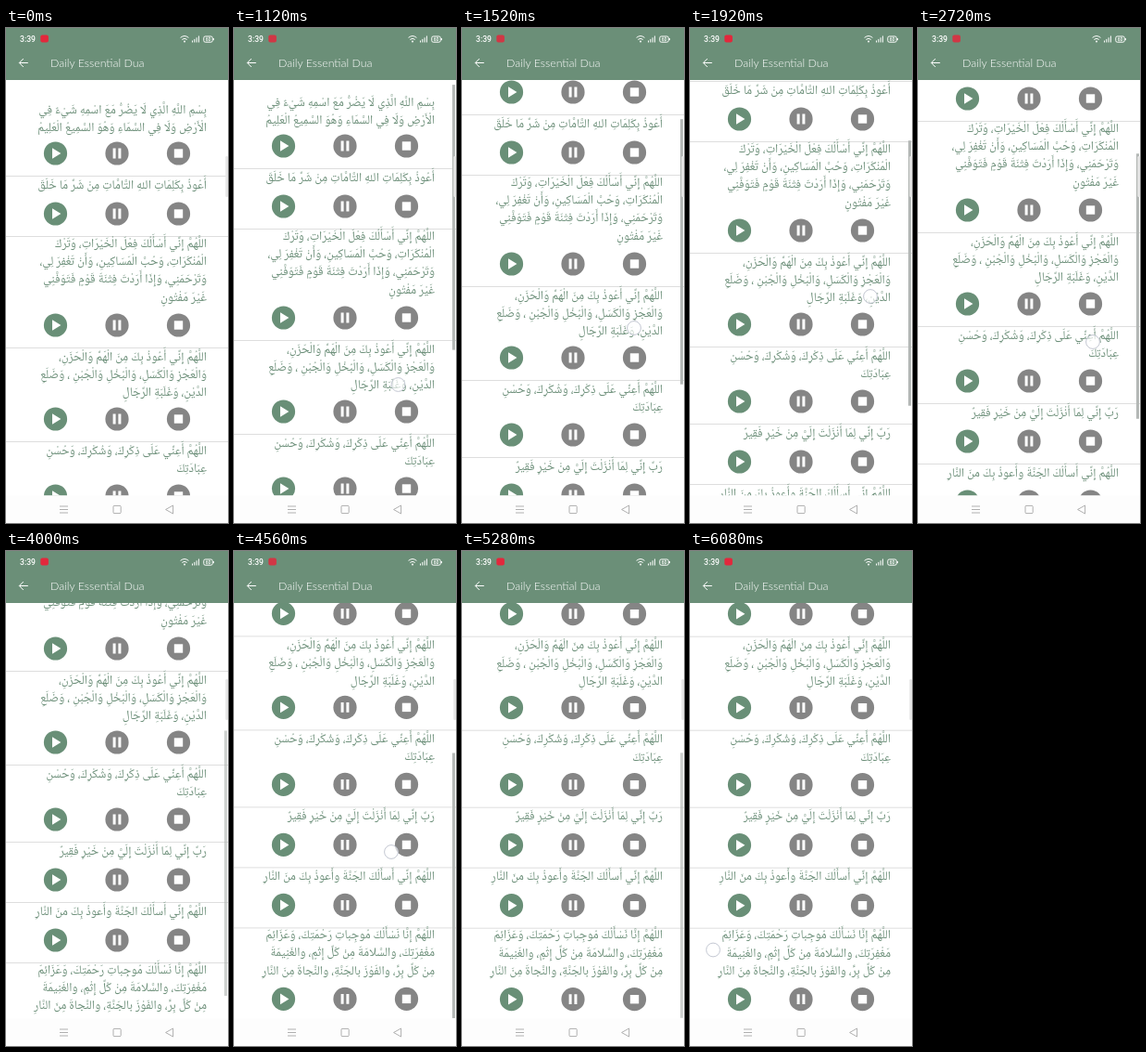
Animation of 240 by 533 pixels, one loop 6160 ms. Source, as an HTML page:

```html
<!DOCTYPE html>
<html lang="en">
<head>
<meta charset="utf-8">
<title>Daily Essential Dua</title>
<style>
  html, body { margin: 0; width: 100%; height: 100%; overflow: hidden; background: #fff; }
  svg { display: block; width: 100%; height: 100%; }
  #list text { font-family: "Noto Naskh Arabic", "Noto Sans Arabic", "DejaVu Sans", sans-serif; fill: #6c8f79; direction: rtl; }
  .title { font: 300 12.3px Lato, sans-serif; fill: #fff; }
  .clock { font: 500 8.6px Roboto, sans-serif; fill: #fff; }
  .level { font: 500 5px Roboto, sans-serif; fill: #fff; text-anchor: middle; }
  .line { fill: none; stroke: #fff; stroke-width: 1; }
  .nav { fill: none; stroke: #a6a6a6; stroke-width: .9; }
</style>
</head>
<body>
<svg viewBox="0 0 240 533">
  <defs>
    <clipPath id="view"><rect y="56" width="240" height="447.5"/></clipPath>
    <g id="controls">
      <circle cx="53.5" r="12.6" fill="#698f77"/>
      <path d="M50 -5.8L59.4 0L50 5.8Z" fill="#fff"/>
      <circle cx="120" r="12.6" fill="#858585"/>
      <path d="M115.6 -5.4h3v10.8h-3zM121.4 -5.4h3v10.8h-3z" fill="#fff"/>
      <circle cx="186.5" r="12.6" fill="#858585"/>
      <rect x="181.8" y="-4.7" width="9.4" height="9.4" fill="#fff"/>
    </g>
  </defs>

  <rect width="240" height="533" fill="#fff"/>
  <g clip-path="url(#view)">
    <g id="list" font-size="11"></g>
    <rect id="bar" x="236" width="3" height="285.5" fill="#b4b8b6"/>
  </g>
  <rect x="237.3" y="138" width="2.7" height="44" rx="1.3" fill="#e6e6e6"/>

  <rect width="240" height="56" fill="#6b8f78"/>
  <text class="clock" x="15" y="15.2">3:39</text>
  <rect id="rec" x="37.3" y="7.4" width="8.6" height="8.2" rx="2" fill="#e2283c"/>
  <path class="line" d="M188.6 10.4q4.4 -3.6 8.8 0M190.3 12.4q2.7 -2.1 5.4 0"/>
  <circle cx="193" cy="14.6" r="1" fill="#fff"/>
  <path class="line" d="M201.5 15.5v-2M203.8 15.5v-3.6M206.1 15.5v-5.2M208.4 15.5v-7"/>
  <rect class="line" x="213.8" y="9" width="9.4" height="6.2" rx="1.6" stroke-width=".9"/>
  <path class="line" d="M224.4 11v2.2"/>
  <text class="level" x="218.5" y="13.9">60</text>
  <path class="line" d="M23.8 37.5H14.6M18.8 33L14.3 37.5L18.8 42" stroke-width="1.5"/>
  <text class="title" x="48" y="42.3">Daily Essential Dua</text>

  <rect y="503.5" width="240" height="29.5" fill="#fdfdfd"/>
  <path class="nav" d="M58 515h9M58 518.5h9M58 522h9"/>
  <rect class="nav" x="116" y="514.4" width="8.2" height="8.2" rx="1"/>
  <path class="nav" d="M180.6 514v9L172.6 518.5Z" stroke-linejoin="round"/>

  <circle id="touch" r="7.4" fill="#fff" fill-opacity=".65" stroke="#c3c7d2" stroke-width="1"/>
</svg>
<script>
const LOOP = 6160, STEP = 80;
const $ = id => document.getElementById(id);
const list = $('list'), bar = $('bar'), rec = $('rec'), touch = $('touch');

// first line centre, controls centre, divider, lines
const duas = [
  [88, 135, 159.5, 'بِسْمِ اللَّهِ الَّذِي لَا يَضُرُّ مَعَ اسْمِهِ شَيْءٌ فِي',
    'الْأَرْضِ وَلَا فِي السَّمَاءِ وَهُوَ السَّمِيعُ الْعَلِيمُ'],
  [169, 200, 224.5, 'أَعُوذُ بِكَلِمَاتِ اللهِ التَّامَّاتِ مِنْ شَرِّ مَا خَلَقَ'],
  [232, 320, 344.5, 'اللَّهُمَّ إِنِّي أَسْأَلُكَ فِعْلَ الْخَيْرَاتِ، وَتَرْكَ',
    'الْمُنْكَرَاتِ، وَحُبَّ الْمَسَاكِينِ، وَأَنْ تَغْفِرَ لِي،',
    'وَتَرْحَمَنِي، وَإِذَا أَرَدْتَ فِتْنَةَ قَوْمٍ فَتَوَفَّنِي',
    'غَيْرَ مَفْتُونٍ'],
  [354, 421, 445.5, 'اللَّهُمَّ إِنِّي أَعُوذُ بِكَ مِنَ الْهَمِّ وَالْحَزَنِ،',
    'وَالْعَجْزِ وَالْكَسَلِ، وَالْبُخْلِ وَالْجُبْنِ ، وَضَلَعِ',
    'الدَّيْنِ، وَغَلَبَةِ الرِّجَالِ'],
  [455, 504, 528.5, 'اللَّهُمَّ أَعِنِّي عَلَى ذِكْرِكَ، وَشُكْرِكَ، وَحُسْنِ',
    'عِبَادَتِكَ'],
  [538, 569, 593.5, 'رَبِّ إِنِّي لِمَا أَنْزَلْتَ إِلَيَّ مِنْ خَيْرٍ فَقِيرٌ'],
  [603, 634, 658.5, 'اللَّهُمَّ إِنِّي أَسأَلُكَ الجَنَّةَ وأَعوذُ بِكَ منَ النَّارِ'],
  [666, 735, 759.5, 'اللَّهُمَّ إِنَّا نَسْأَلُكَ مُوجِباتِ رَحْمَتِكَ، وَعَزَائِمَ',
    'مَغْفِرَتِكَ، والسَّلامَةَ مِنْ كُلِّ إِثْمٍ، والغَنِيمَةَ',
    'مِنْ كُلِّ بِرٍّ، والفَوْزَ بالجَنَّةِ، والنَّجاةَ مِنَ النَّارِ']
];

list.innerHTML = duas.map(([top, mid, end, ...lines]) =>
  lines.map((s, i) => `<text x="217" y="${top + 3.5 + i * 19.4}">${s}</text>`).join('') +
  `<use href="#controls" y="${mid}"/>` +
  `<path d="M0 ${end}H240" stroke="#dedede"/>`).join('');

// one type size for the whole list, whichever Arabic face is present
const wide = list.querySelector('text').getComputedTextLength();
if (wide) list.setAttribute('font-size', (11 * 182 / wide).toFixed(2));

// rows of [time, value...], linear in between
function at(rows, t) {
  if (t <= rows[0][0]) return rows[0].slice(1);
  for (let i = 1; i < rows.length; i++) {
    const a = rows[i - 1], b = rows[i];
    if (t <= b[0]) {
      const k = (t - a[0]) / (b[0] - a[0]);
      return a.slice(1).map((v, j) => v + (b[j + 1] - v) * k);
    }
  }
  return rows[rows.length - 1].slice(1);
}

const scroll = [[1040, 0], [1200, 16], [1360, 43], [1520, 66], [1680, 83], [1920, 102], [2080, 110],
  [2560, 110], [2720, 124], [2960, 160], [3120, 182], [3280, 203], [3440, 215],
  [4080, 215], [4240, 228], [4400, 244], [4560, 252.6], [4720, 252.3]];
const barAlpha = [[960, 0], [1040, 1], [2480, 1], [2560, .75], [2640, 1], [3760, 1],
  [4000, .65], [4080, .65], [4160, 1], [5120, 1], [5600, 0]];
const drags = [
  [[1040, 177, 393], [1200, 178, 375], [1360, 182, 347], [1520, 186, 323], [1680, 190, 307], [1920, 195, 289], [2000, 196, 285]],
  [[2560, 186, 354], [2720, 189, 338], [2960, 194, 301], [3120, 197, 278], [3280, 199, 257]],
  [[4080, 166, 370], [4240, 167, 355], [4400, 168, 338], [4560, 170, 324], [4720, 172, 312]],
  [[6080, 25, 429.5], [6160, 25, 429.5]]
];
const blinks = [160, 1680, 2640, 3680, 4400, 5280];

function draw(time) {
  const t = Math.floor(time % LOOP / STEP) * STEP;
  const [y] = at(scroll, t);
  list.setAttribute('transform', `translate(0 ${-y})`);
  bar.setAttribute('y', 56 + y * 447.5 / 700);
  bar.setAttribute('opacity', at(barAlpha, t)[0]);

  const drag = drags.find(d => t >= d[0][0] && t <= d[d.length - 1][0]);
  touch.setAttribute('visibility', drag ? 'visible' : 'hidden');
  if (drag) touch.setAttribute('transform', `translate(${at(drag, t)})`);

  rec.setAttribute('opacity', blinks.filter(b => b <= t).length % 2 ? .85 : 1);
}

const start = performance.now();
(function tick() {
  draw(performance.now() - start);
  requestAnimationFrame(tick);
})();
</script>
</body>
</html>
```
